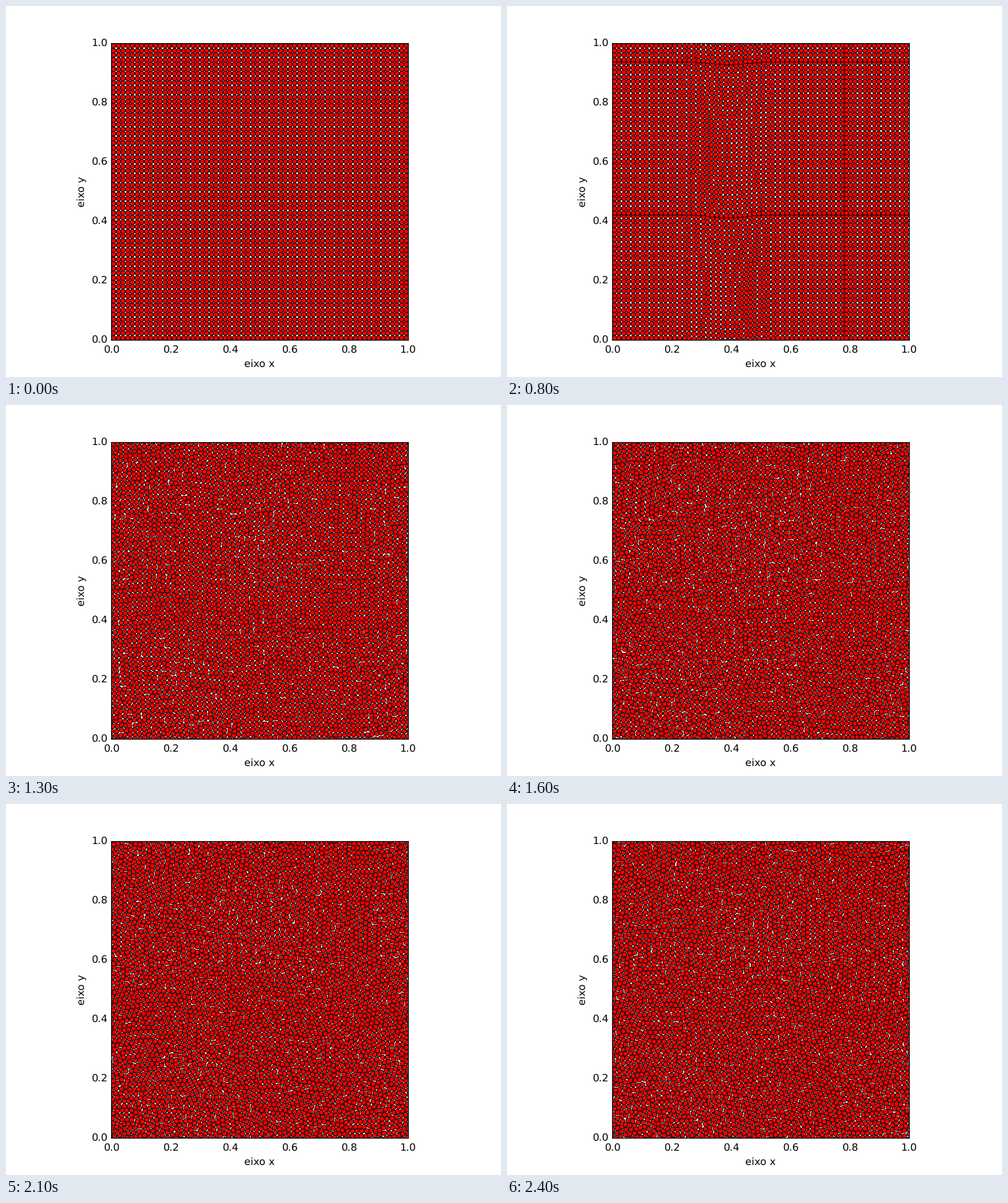
Animation, 692 px wide and 519 px high, one loop 2500 ms. Source, as a matplotlib script:

```python
import numpy as np
import matplotlib.pyplot as plt
from matplotlib.animation import FuncAnimation

plt.style.use("classic")
plt.rcParams.update({
    "font.family": "DejaVu Sans",
    "text.hinting": "none",
    "savefig.dpi": "figure",
    "figure.facecolor": "white",
    "savefig.facecolor": "white",
})

N = 64             # particles per side; lengths are in lattice spacings
FRAMES = 25
INTERVAL = 100
CALM = 8           # frames of smooth deformation before the lattice melts
SUBSTEPS = 10
REACH = 1.35       # range of the repulsion
STIFF = 0.16


def wrap(d):
    """Shortest periodic separation."""
    return d - N * np.round(d / N)


def kink(u, c, a=0.003, w=0.006):
    """Narrow compression at c, balanced by a slight stretch elsewhere."""
    v = (u - c + 0.5) % 1 - 0.5
    return 2 * a * v - a * np.tanh(v / w)


def lattice(s):
    """Square lattice deformed by the fraction s."""
    u = (np.arange(N) + 0.5) / N
    x, y = (g.ravel() for g in np.meshgrid(u, u))
    bulge = np.exp(-((x - 0.39) / 0.09) ** 2)
    dx = s * 0.006 * bulge * np.sin(2 * np.pi * y + 0.6) + s**2 * kink(x, 0.785)
    dy = s * (0.002 - 0.010 * bulge)
    dy += s**2 * (kink(y, 0.425) + kink(y, 0.94))
    return N * np.column_stack([x + dx, y + dy])


def neighbours(p, reach=2.0):
    """Ordered index pairs closer than reach, found with a cell table."""
    m = N // 2
    cx, cy = np.floor(p % N / 2).astype(int).T % m
    cell = cx * m + cy
    order = np.argsort(cell, kind="stable")
    count = np.bincount(cell, minlength=m * m)
    start = np.cumsum(count) - count
    rank = np.arange(len(p)) - start[cell[order]]
    table = np.full((m * m, count.max()), -1)
    table[cell[order], rank] = order

    sx, sy = (g.ravel() for g in np.meshgrid([-1, 0, 1], [-1, 0, 1]))
    near = (cx[:, None] + sx) % m * m + (cy[:, None] + sy) % m
    j = table[near].reshape(len(p), -1)
    i = np.broadcast_to(np.arange(len(p))[:, None], j.shape)
    keep = (j >= 0) & (i != j)
    i, j = i[keep], j[keep]
    close = np.hypot(*wrap(p[i] - p[j]).T) < reach
    return i[close], j[close]


def push(p, i, j):
    """Soft repulsion summed over all neighbours."""
    d = wrap(p[i] - p[j])
    r = np.hypot(*d.T) + 1e-9
    f = np.clip(1 - r / REACH, 0, None) / r
    return np.column_stack([
        np.bincount(i, f * d[:, k], minlength=len(p)) for k in (0, 1)
    ])


def flow(p, t):
    """Slow periodic stirring, in spacings per frame."""
    x, y = 2 * np.pi * p.T / N
    ux = 0.14 * np.sin(y + 0.15 * t) + 0.06 * np.sin(2 * y + 1.3)
    uy = 0.14 * np.sin(x - 0.15 * t + 2) + 0.06 * np.sin(2 * x + 0.4)
    return np.column_stack([ux, uy])


def with_images(p):
    """Unit-square positions plus the periodic copies that touch the border."""
    q = p % N / N
    for axis in (0, 1):
        step = np.eye(2)[axis]
        low, high = q[q[:, axis] < 0.01], q[q[:, axis] > 0.99]
        q = np.concatenate([high - step, q, low + step])
    return q


def simulate():
    rng = np.random.default_rng(7)
    states = [lattice(t / CALM) for t in range(CALM + 1)]
    p = states[-1].copy()
    for t in range(CALM + 1, FRAMES):
        heat = min(1, (t - CALM) / 4)
        i, j = neighbours(p)
        for _ in range(SUBSTEPS):
            p = p + heat * (STIFF * push(p, i, j) + flow(p, t) / SUBSTEPS)
            p += rng.normal(0, 0.006 + 0.014 * heat, p.shape)
        p %= N
        states.append(p.copy())
    return [with_images(s) for s in states]


states = simulate()

fig, ax = plt.subplots(figsize=(8, 6), dpi=86.5)
dots = ax.scatter(*states[0].T, s=30, c="red", edgecolors="black",
                  linewidths=0.8)
ax.set_aspect("equal")
ax.set(xlim=(0, 1), ylim=(0, 1))
ax.tick_params(axis="x", pad=5.5)
ax.set_xlabel("eixo x", labelpad=6)
ax.set_ylabel("eixo y")


def update(n):
    dots.set_offsets(states[n])
    return (dots,)


anim = FuncAnimation(fig, update, frames=FRAMES, interval=INTERVAL,
                     repeat=True, repeat_delay=0)
plt.show()
```
